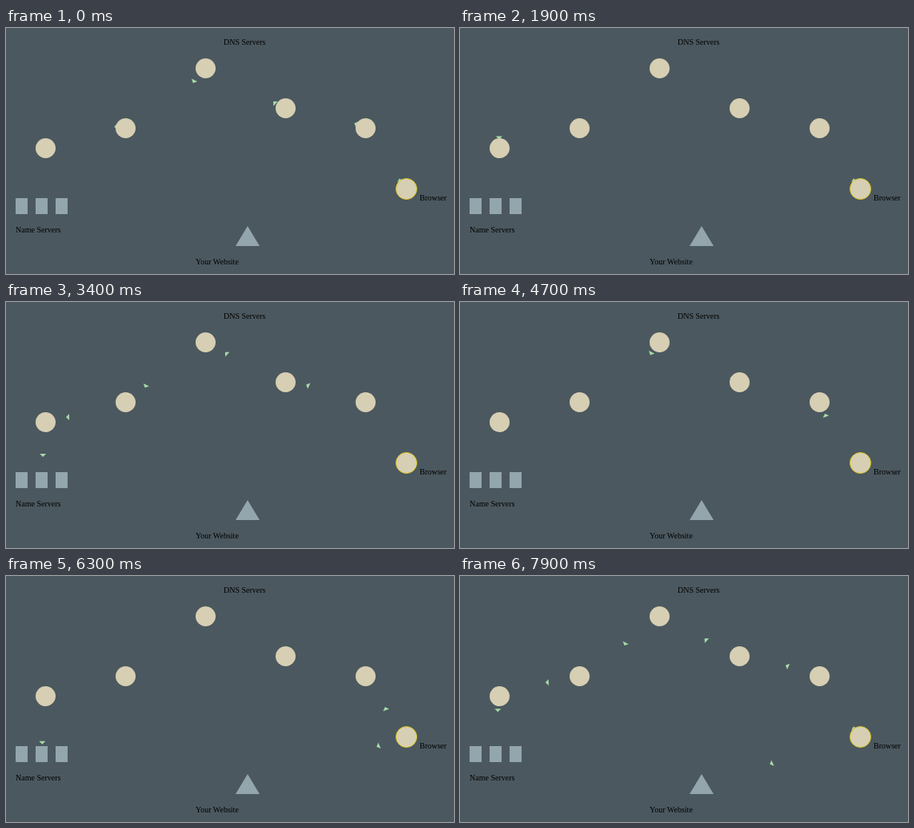
Animation, 560 px wide and 308 px high, one loop 8000 ms. Source, as an HTML page:

```html
<!DOCTYPE html>
<html lang="en">
<head>
<meta charset="utf-8">
<title>DNS lookup</title>
<style>
  html, body { margin: 0; width: 560px; height: 308px; overflow: hidden; background: #4b585f; }
  svg { display: block; }
  text { font: 10px "Liberation Serif", "Times New Roman", serif; fill: #000; }
</style>
</head>
<body>
<svg width="560" height="308" viewBox="0 0 560 308">
  <g id="packets" fill="#a4dca8"></g>
  <g id="nodes" fill="#d7cfb3">
    <circle cx="500.5" cy="201.5" r="13" stroke="#dfc61c"/>
  </g>
  <path fill="#94a6ad" d="M12 213h15v20h-15zM37 213h15v20h-15zM62 213h15v20h-15zM302 248l15 25h-30z"/>
  <text x="272" y="21">DNS Servers</text>
  <text x="12" y="256">Name Servers</text>
  <text x="517" y="216">Browser</text>
  <text x="237" y="296">Your Website</text>
</svg>
<script>
const LOOP = 8000, STEP = 100;

// Runs as [start, duration] in ms
const relay = [[-497, 2160], [1840, 2400], [4249, 2400], [6840, 2400]];
const request = [-420, 1480, 3480, 5480, 7480].map(s => [s, 1640]);
const visit = [[4616, 6100]];

// Packet routes: x1, y1, x2, y2, heading, runs
const routes = [
  [449.7, 123.2, 349.7, 97.2, 114, relay],
  [348, 99.5, 248, 51, 131, relay],
  [247.2, 59.2, 147.2, 122.9, 26, relay],
  [149.7, 119.3, 49.7, 153.5, 88, relay],
  [48.8, 137.5, 45.1, 212.5, 0, relay],
  [500, 201, 449, 131, 161, request],
  [500, 203, 302, 260, 65, visit]
];

function add(parent, tag, attrs) {
  const el = document.createElementNS("http://www.w3.org/2000/svg", tag);
  for (const key in attrs) el.setAttribute(key, attrs[key]);
  return document.getElementById(parent).appendChild(el);
}

for (const [cx, cy] of [[449.5, 125.5], [349.5, 100.5], [249.5, 50.5], [149.5, 125.5], [49.5, 150.5]])
  add("nodes", "circle", { cx, cy, r: 12.5 });

const packets = routes.map(() => add("packets", "path", { d: "M-4-2h8l-4 4z" }));

const swing = p => (1 - Math.cos(Math.PI * p)) / 2;

function draw(t) {
  routes.forEach(([x1, y1, x2, y2, heading, runs], i) => {
    const run = runs.filter(([start]) => start <= t).pop();
    packets[i].style.display = run ? "" : "none";
    if (!run) return;
    const k = swing(Math.min(1, (t - run[0]) / run[1]));
    const x = x1 + (x2 - x1) * k, y = y1 + (y2 - y1) * k;
    packets[i].setAttribute("transform", `translate(${x} ${y}) rotate(${heading})`);
  });
}

const origin = performance.now();
function frame() {
  const t = (performance.now() - origin) % LOOP;
  draw(Math.floor(t / STEP) * STEP);
  requestAnimationFrame(frame);
}
frame();
</script>
</body>
</html>
```
